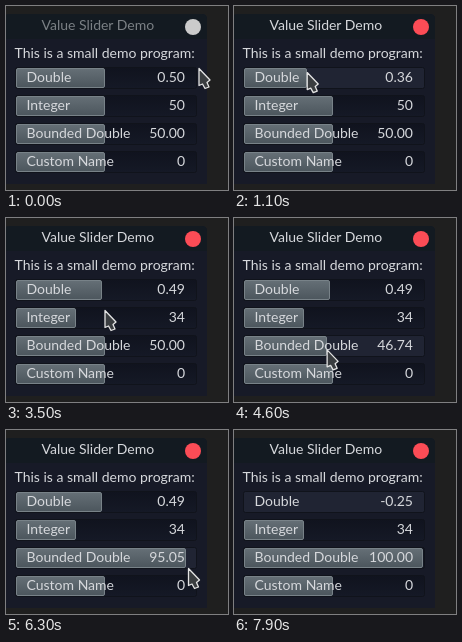
These frames come from a looping animation (222 by 184 pixels, 8000 ms). An HTML page:

```html
<!DOCTYPE html>
<html lang="en">
<head>
<meta charset="utf-8">
<title>Value Slider Demo</title>
<style>
  html, body { margin: 0; width: 100%; height: 100%; overflow: hidden; background: #1f1f1f; }
  svg { display: block; width: 222px; height: 184px; }
  text { font: 14px Lato, sans-serif; fill: #d6d8dc; white-space: pre; }
  .end { text-anchor: end; }
  .edit { font-size: 20px; }
</style>
</head>
<body>
<svg viewBox="0 0 222 184">
  <defs>
    <linearGradient id="knob" x2="0" y2="1">
      <stop stop-color="#656f76"/>
      <stop offset="1" stop-color="#4c565d"/>
    </linearGradient>
    <linearGradient id="track" x2="0" y2="1">
      <stop stop-color="#10131e"/>
      <stop offset="1" stop-color="#151926"/>
    </linearGradient>
  </defs>
  <rect width="222" height="184" fill="#1f1f1f"/>
  <path d="M0 9Q1 8 4 8H196Q201 8 201 13V178H0Z" fill="#171a27"/>
  <path d="M0 9Q1 8 4 8H196Q201 8 201 13V33H0Z" fill="#131a21"/>
  <text id="title" x="35.5" y="24">Value Slider Demo</text>
  <circle id="close" cx="187" cy="21" r="8"/>
  <text x="8.5" y="52">This is a small demo program:</text>
  <g id="rows"></g>
  <path id="cursor" d="M0 .5L11 12L8 14.5L10 19L6 20.5L3.5 16L0 17.5Z"
        fill="#3a3d40" stroke="#e4e4e4" stroke-width="1.3" stroke-linejoin="round"/>
</svg>
<script>
const LOOP = 8000, STEP = 100;
const NS = "http://www.w3.org/2000/svg";
const $ = id => document.getElementById(id);
const clamp = (v, a, b) => Math.min(b, Math.max(a, v));

const linear = u => u;
const easeIn = u => u * u;
const easeOut = u => 1 - (1 - u) ** 3;

// Pointer moves; it rests between them
const start = { x: 193, y: 62 };
const moves = [
  { from: 0, to: 1350, x: 46, y: 67 },
  { from: 1400, to: 2000, x: 106, y: 87 },
  { from: 2000, to: 2100, x: 106, y: 91 },
  { from: 2600, to: 2700, x: 99, y: 92 },
  { from: 4000, to: 4400, x: 99, y: 131 },
  { from: 4400, to: 5300, x: -20, y: 138, ease: easeIn },
  { from: 5700, to: 6500, x: 250, y: 138 },
  { from: 6800, to: 7300, x: 97, y: 70, ease: easeOut },
  { from: 7300, to: 7900, x: -39.6, y: 72 }
];

// While pressed a slider follows the pointer, then rests at a value
const drags = [
  { row: 0, press: 900, release: 1800, rest: .486 },
  { row: 2, press: 4500, release: 6700, rest: 1 },
  { row: 0, press: 7300, release: LOOP }
];
const typing = { open: 2300, blink: 2900, first: 3100, second: 3200, close: 3500 };

function add(parent, tag, attrs, text = "") {
  const el = document.createElementNS(NS, tag);
  for (const key in attrs) el.setAttribute(key, attrs[key]);
  el.textContent = text;
  return parent.appendChild(el);
}

const sliders = [
  { name: "Double", format: v => v.toFixed(2) },
  { name: "Integer", format: v => Math.round(v * 100) },
  { name: "Bounded Double", format: v => (v * 100).toFixed(2), bounded: true },
  { name: "Custom Name", format: () => 0 }
];
const rows = sliders.map(({ name }, i) => {
  const g = add($("rows"), "g", { transform: `translate(0 ${62 + 28 * i})` });
  return {
    track: add(g, "rect", { x: 9.5, y: -.5, width: 181, height: 21, rx: 2, stroke: "#10131b" }),
    fill: add(g, "rect", { x: 10.5, y: .5, height: 19, rx: 1.5, fill: "url(#knob)", stroke: "#788288" }),
    label: add(g, "text", { x: 20.5, y: 14 }, name),
    value: add(g, "text", { x: 179, y: 14, class: "end" })
  };
});
const edit = add($("rows"), "text", { x: 14.5, y: 107, class: "edit" });
const caret = add($("rows"), "rect", { y: 90, width: 1, height: 20, fill: "#e6e6e6" });

const show = (el, on) => el.setAttribute("visibility", on ? "visible" : "hidden");

function pointerAt(t) {
  let { x, y } = start;
  for (const m of moves) {
    const k = (m.ease || linear)(clamp((t - m.from) / (m.to - m.from), 0, 1));
    x += (m.x - x) * k;
    y += (m.y - y) * k;
  }
  return { x, y };
}

function valuesAt(t, x) {
  const values = [.5, t < typing.close ? .5 : .34, .5, .5];
  let active = -1;
  for (const { row, press, release, rest } of drags) {
    if (t < press) continue;
    const dragged = (x - 6.66) / 185;
    if (t < release) active = row;
    values[row] = t >= release ? rest : sliders[row].bounded ? clamp(dragged, 0, 1) : dragged;
  }
  return { values, active };
}

function draw(time) {
  const t = Math.floor(time % LOOP / STEP) * STEP;
  const { x, y } = pointerAt(t);
  const { values, active } = valuesAt(t, x);
  const focused = t >= drags[0].press;
  const editing = t >= typing.open && t < typing.close;

  $("title").style.fill = focused ? "#d6d8dc" : "#7b8085";
  $("close").setAttribute("fill", focused ? "#fc4c56" : "#cbcbcb");
  $("cursor").setAttribute("transform", `translate(${x} ${y})`);

  rows.forEach((r, i) => {
    const typed = editing && i === 1;
    const width = Math.floor(clamp(values[i], 0, 1) * 180) - 2;
    r.track.setAttribute("fill", i === active ? "#202433" : "url(#track)");
    r.fill.setAttribute("width", Math.max(0, width));
    r.value.textContent = sliders[i].format(values[i]);
    show(r.fill, !typed && width > 0);
    show(r.label, !typed);
    show(r.value, !typed);
  });

  edit.textContent = t < typing.first ? "50" : t < typing.second ? "3" : "34";
  show(edit, editing);
  caret.setAttribute("x", 15 + 11.6 * edit.textContent.length);
  show(caret, editing && (t < typing.blink || t >= typing.first));
}

function tick(now) {
  draw(now);
  requestAnimationFrame(tick);
}
draw(0);
requestAnimationFrame(tick);
</script>
</body>
</html>
```
